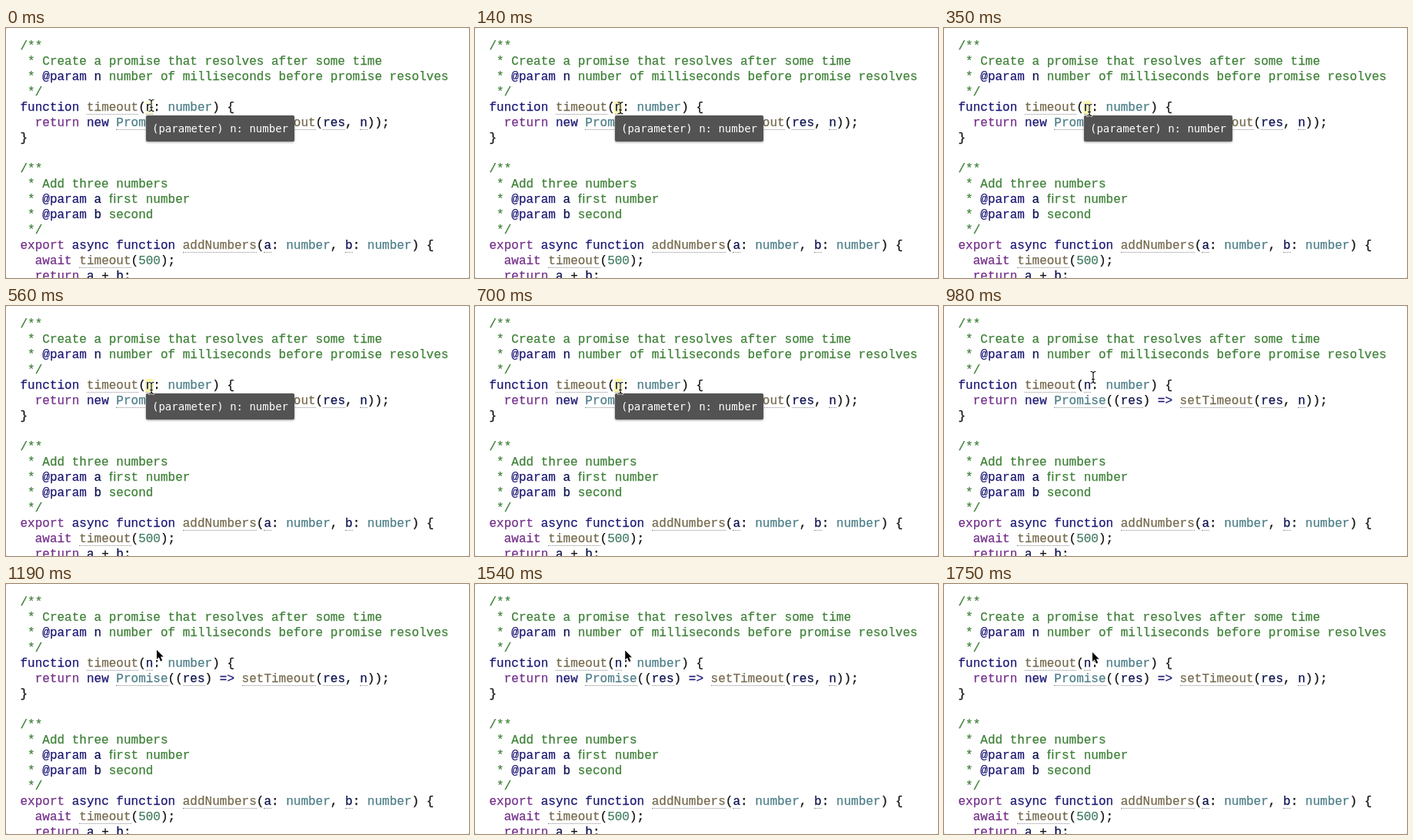
Animation, 602 px wide and 326 px high, one loop 1820 ms. Source, as an HTML page:

```html
<!DOCTYPE html>
<html lang="en">
<head>
<meta charset="utf-8">
<title>Code hover</title>
<style>
html, body { margin: 0; width: 100%; height: 100%; overflow: hidden; background: #dcdcdc; }
#stage { position: relative; width: 602px; height: 326px; overflow: hidden; background: #fff; border-radius: 3px; }
pre { position: absolute; left: 18.5px; top: 14px; margin: 0; color: #111; -webkit-text-stroke: .25px;
  font: 16px/20px Courier, "Liberation Mono", monospace; }
pre span { position: relative; }
.c { color: #3f8038; }
.k { color: #1c1874; }
.r { color: #74308a; }
.f { color: #766a4e; }
.t { color: #4c7e88; }
.v { color: #0c1250; }
.d { color: #467f66; }
.u::after { content: ""; position: absolute; left: 0; right: 0; bottom: 0; border-bottom: 1px dotted #8c8c8c; }
#glow { position: absolute; left: 181px; top: 95px; width: 11px; height: 18px; background: #fbf7a8; border-radius: 3px; }
#tip { position: absolute; left: 182px; top: 114px; width: 193px; height: 34px; box-sizing: border-box; padding-left: 8px;
  border-radius: 2px; background: #535353; color: #fff; box-shadow: 0 1px 3px #0006;
  font: 14px/34px "DejaVu Sans Mono", monospace; white-space: pre; }
svg { position: absolute; left: 0; top: 0; }
</style>
</head>
<body>
<div id="stage">
<div id="glow"></div>
<pre><span class="c">/**
 * Create a promise that resolves after some time
 * <span class="k">@param</span> <span class="v">n</span> number of milliseconds before promise resolves
 */</span>
<span class="k">function</span> <span class="f u">timeout</span>(<span class="v u">n</span>: <span class="t">number</span>) {
  <span class="r">return</span> <span class="k">new</span> <span class="t u">Promise</span>((<span class="v u">res</span>) <span class="k">=&gt;</span> <span class="f u">setTimeout</span>(<span class="v u">res</span>, <span class="v u">n</span>));
}

<span class="c">/**
 * Add three numbers
 * <span class="k">@param</span> <span class="v">a</span> &#xFB01;rst number
 * <span class="k">@param</span> <span class="v">b</span> second
 */</span>
<span class="r">export</span> <span class="k">async</span> <span class="k">function</span> <span class="f u">addNumbers</span>(<span class="v u">a</span>: <span class="t">number</span>, <span class="v u">b</span>: <span class="t">number</span>) {
  <span class="r">await</span> <span class="f u">timeout</span>(<span class="d">500</span>);
  <span class="r">return</span> <span class="v">a</span> + <span class="v">b</span>;</pre>
<div id="tip">(parameter) n: number</div>
<svg width="602" height="326">
  <defs>
    <path id="bar" d="M-3-7.5Q0-7.5 0-5Q0-7.5 3-7.5M0-5V5M-3 7.5Q0 7.5 0 5Q0 7.5 3 7.5M-1.5 2.5H1.5"/>
  </defs>
  <g id="beam" fill="none" stroke-linecap="round">
    <use href="#bar" stroke="#fff" stroke-width="2.6"/>
    <use href="#bar" stroke="#111" stroke-width="1.2"/>
  </g>
  <path id="arrow" d="M0 0V12L2.8 9.6L5 14.8L7.2 13.8L5 8.8H8.7Z" stroke="#fff" stroke-width="1.6" paint-order="stroke"/>
</svg>
</div>
<script>
const LOOP = 1820, STEP = 70, HIDE_TIP = 980, TO_ARROW = 1050;
// pointer path: time, x, y
const path = [
  [0, 189, 101], [210, 189, 106], [350, 189, 107], [700, 189, 107],
  [840, 190, 103], [910, 191, 99], [980, 194, 93],
  [1050, 196, 88], [1190, 196, 86], [1470, 196, 86], [1750, 193, 89]
];
const [beam, arrow, tip, glow] = ["beam", "arrow", "tip", "glow"].map(id => document.getElementById(id));
const show = (el, on) => el.style.visibility = on ? "visible" : "hidden";

function pointerAt(t) {
  const i = Math.max(1, path.findIndex(p => p[0] >= t));
  const a = path[i - 1], b = path[i], k = (t - a[0]) / (b[0] - a[0]);
  return [1, 2].map(j => a[j] + (b[j] - a[j]) * k);
}

function draw(now) {
  const t = Math.floor(now % LOOP / STEP) * STEP;
  const move = `translate(${pointerAt(t)})`;
  beam.setAttribute("transform", move);
  arrow.setAttribute("transform", move);
  show(beam, t < TO_ARROW);
  show(arrow, t >= TO_ARROW);
  show(tip, t < HIDE_TIP);
  show(glow, t < HIDE_TIP);
  glow.style.opacity = Math.min(1, .5 + t / 280, .5 + Math.max(0, 910 - t) / 280);
  requestAnimationFrame(draw);
}
requestAnimationFrame(draw);
</script>
</body>
</html>
```
